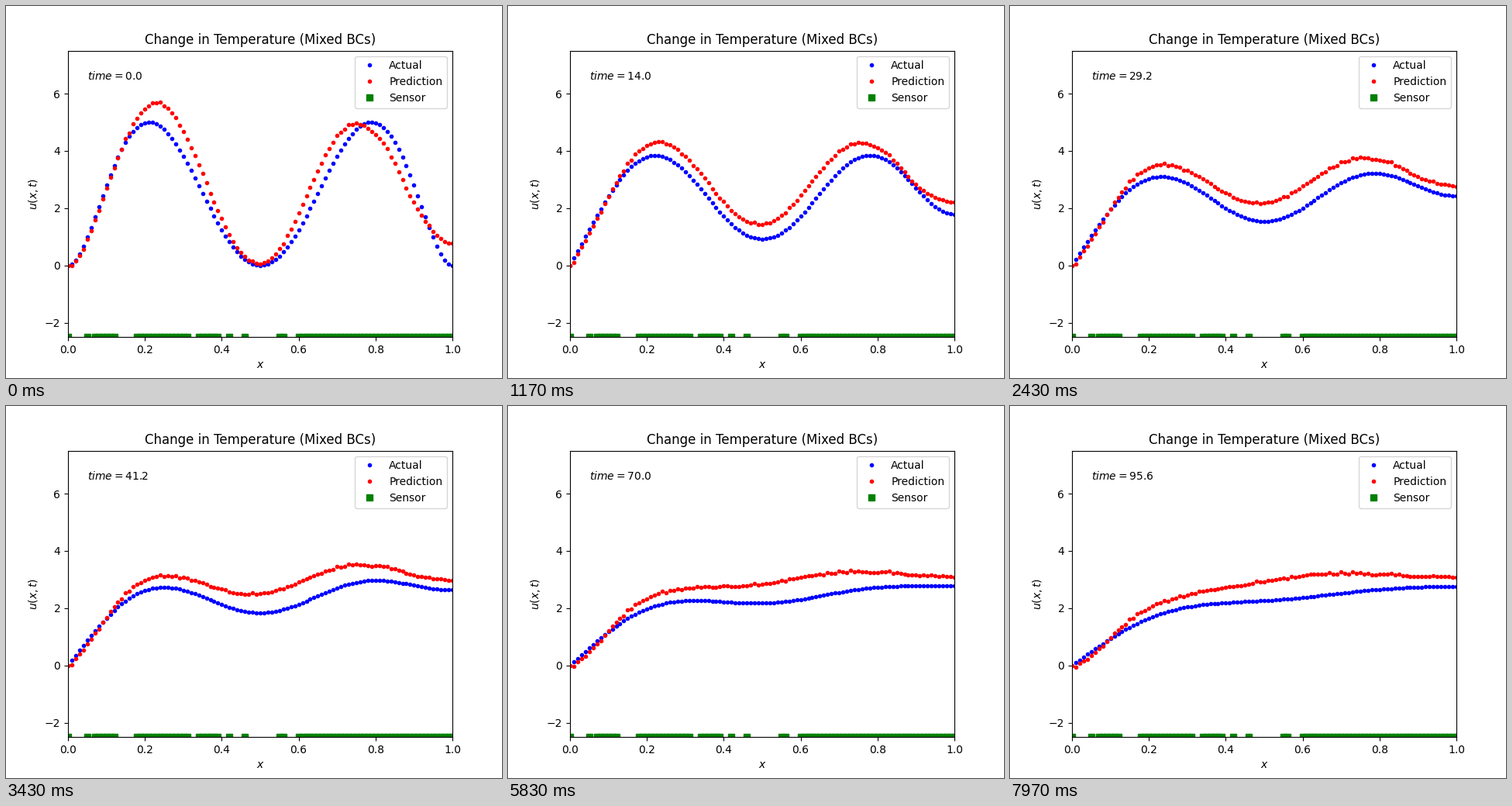
A matplotlib script for the animation above (8000 ms loop, 640 by 480 pixels).

```python
import numpy as np
import matplotlib.pyplot as plt
from matplotlib.animation import FuncAnimation

LOOP_MS = 8000
STEPS = 239       # the final step is held for one extra tick
DT = 0.4          # simulated time per step
ALPHA = 3e-4      # diffusivity
FADE = 10         # time scale on which the prediction error settles

x = np.linspace(0, 1, 101)


def initial(s):
    return 2160 * (s * (1 - s) * (s - 0.5)) ** 2


# Heat equation with u(0) = 0 and u_x(1) = 0, as a sum of sine modes
grid = (np.arange(4000) + 0.5) / 4000
freq = (np.arange(100) + 0.5) * np.pi
coef = 2 * np.sin(np.outer(freq, grid)) @ initial(grid) / grid.size
modes = np.sin(np.outer(x, freq))


def actual(t):
    if t == 0:
        return initial(x)
    return modes @ (coef * np.exp(-ALPHA * freq ** 2 * t))


def ease_through(points):
    """Curve with cosine easing from each turning point to the next."""
    px, py = np.array(points).T
    i = np.searchsorted(px, x, side='right') - 1
    u = (x - px[i]) / (px[i + 1] - px[i])
    return py[i] + (py[i + 1] - py[i]) * (1 - np.cos(np.pi * u)) / 2


# Prediction error: a wavy start settles into a step plus a broad hump
early = ease_through([(0, -0.06), (0.1, -0.11), (0.275, 0.9), (0.49, 0.06),
                      (0.665, 0.8), (0.867, -0.78), (1.01, 0.8)])
step = 0.6 / (1 + np.exp((0.118 - x) / 0.03))
hump = 0.42 * np.exp(-((x - 0.62) / 0.16) ** 2 / 2)
late = step + hump - 0.13 * x - 0.18
rough = np.random.default_rng(4).normal(0, 0.02, x.size)


def predicted(t):
    u = actual(t) + late + (early - late) * np.exp(-t / FADE) + rough
    u[0] = 0
    return u


spans = [(0, 0), (5, 5), (7, 12), (18, 31), (34, 39),
         (42, 42), (46, 46), (55, 56), (60, 100)]
sensors = np.concatenate([np.arange(a, b + 1) for a, b in spans]) / 100

fig, ax = plt.subplots(figsize=(6.4, 4.8), dpi=100)
ax.set(xlim=(0, 1), ylim=(-2.5, 7.5), xlabel='$x$', ylabel='$u(x,t)$',
       title='Change in Temperature (Mixed BCs)')
blue, = ax.plot(x, actual(0), 'b.', label='Actual')
red, = ax.plot(x, predicted(0), 'r.', label='Prediction')
ax.plot(sensors, np.full(sensors.size, -2.5), 'gs', label='Sensor')
clock = ax.text(0.05, 0.9, '', transform=ax.transAxes)
ax.legend(loc='upper right')


def update(n):
    t = min(n, STEPS) * DT
    blue.set_ydata(actual(t))
    red.set_ydata(predicted(t))
    clock.set_text(f'$time = {t:.1f}$')
    return blue, red, clock


ticks = STEPS + 2
anim = FuncAnimation(fig, update, frames=ticks, interval=LOOP_MS / ticks,
                     repeat=True, repeat_delay=0)
plt.show()
```
